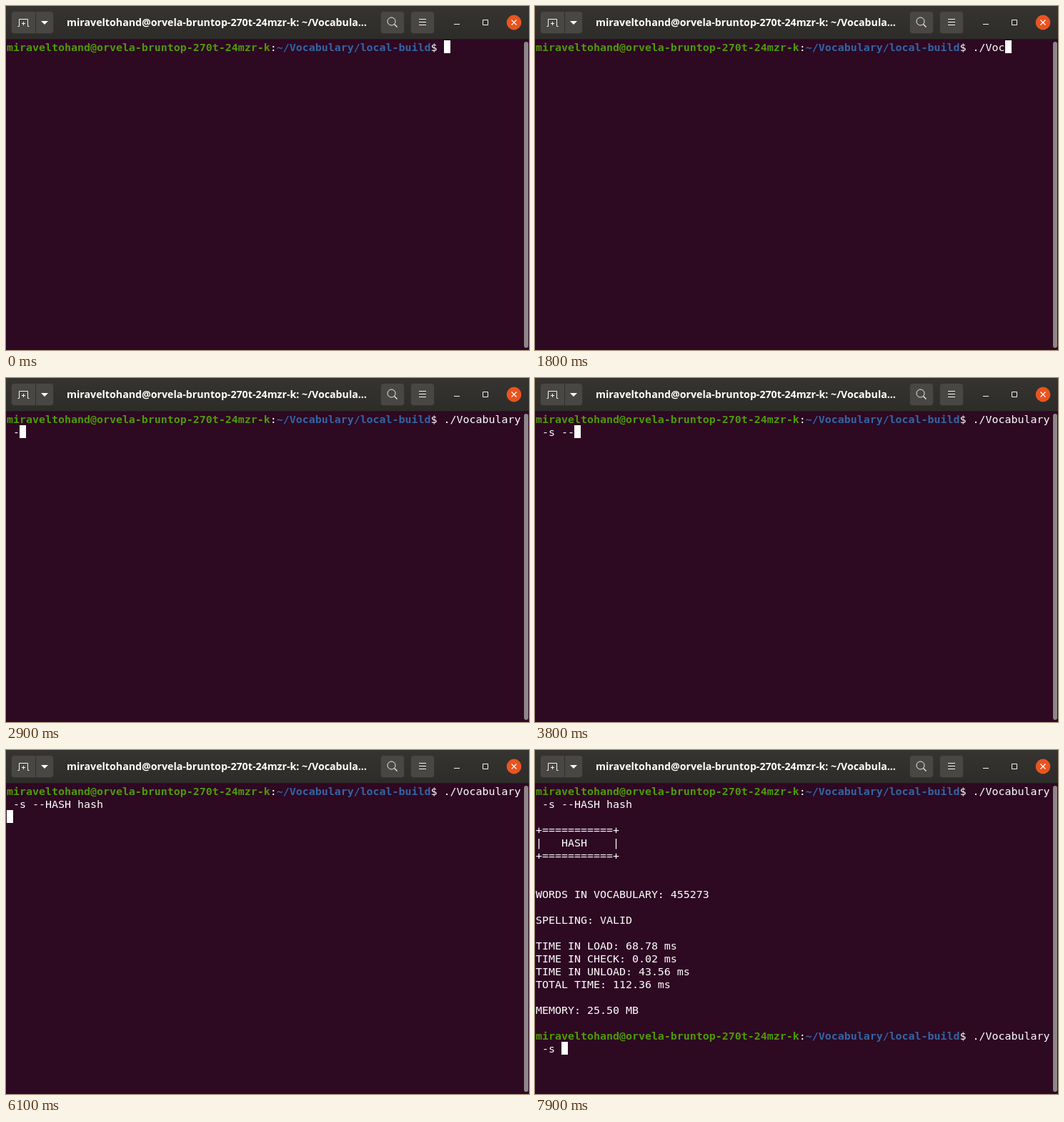
Write an HTML page that moves like this. It is 732x481 px and loops after 8000 ms.

```html
<!DOCTYPE html>
<html lang="en">
<head>
<meta charset="utf-8">
<title>Terminal</title>
<style>
  html, body { margin: 0; width: 100%; height: 100%; overflow: hidden; background: #2d0922; }
  svg { position: absolute; left: 0; top: 0; }
  pre {
    position: absolute; left: 1px; top: 49px; margin: 0; color: #fff;
    font: 14.95px/18px "DejaVu Sans Mono", monospace;
  }
  .host { color: #4e9a06; }
  .path { color: #3465a4; }
  #cursor { position: absolute; width: 9px; height: 18px; background: #fff; }
</style>
</head>
<body>
<svg width="732" height="481" viewBox="0 0 732 481">
  <defs>
    <linearGradient id="bar" x2="0" y2="1">
      <stop stop-color="#353431"/><stop offset="1" stop-color="#2d2c29"/>
    </linearGradient>
  </defs>
  <rect width="732" height="46" fill="url(#bar)"/>
  <rect y="46" width="732" height="1" fill="#1d1c1a"/>
  <g fill="#484744" stroke="#353431">
    <rect x="7.5" y="7.5" width="59" height="31" rx="4"/>
    <rect x="524.5" y="7.5" width="33" height="31" rx="4"/>
    <rect x="566.5" y="7.5" width="33" height="31" rx="4"/>
  </g>
  <path d="M41.5 8V38" stroke="#302f2c"/>
  <g fill="none" stroke="#f2f2f0">
    <path d="M16.5 28.5H18.5V18.5H30.5V28.5H32.5M22 24.5H27M24.5 22V27"/>
    <circle cx="539.5" cy="21.5" r="5.5"/>
    <path d="M543.5 25.5L547.5 29.5" stroke-width="1.2"/>
    <path d="M578 18.5H588M578 22.5H588M578 26.5H588"/>
    <path d="M627 25.5H635M667.5 19.5H674.5V26.5H667.5Z"/>
  </g>
  <path d="M49 21H59L54 26Z" fill="#fff"/>
  <circle cx="711" cy="23" r="10.4" fill="#e95420"/>
  <path d="M707.5 19.5L714.5 26.5M714.5 19.5L707.5 26.5" stroke="#fff" stroke-width="1.2"/>
  <text id="title" x="295" y="28" text-anchor="middle" fill="#fff"
        font-family="Open Sans, sans-serif" font-size="14.2" font-weight="700"></text>
  <rect x="725" y="50" width="6" height="428" rx="3" fill="#8f8789"/>
</svg>
<div id="cursor"></div>
<pre id="screen"></pre>
<script>
const LOOP = 8000, TICK = 100, KEY_GAP = 80;
const COLS = 80, CELL_W = 9, CELL_H = 18;
const ENTER = 6100, REPORT = 6300, BLINK_OFF = 6700, BLINK_ON = 7000;
const RECALL = 7500, ERASE_GAP = 200;

const host = "miraveltohand@orvela-bruntop-270t-24mzr-k";
const path = "~/Vocabulary/local-build";
const promptLength = host.length + path.length + 3;
const firstRow = COLS - promptLength;

// Bursts of typing by start time
const bursts = {
  400: "./", 800: "V", 1400: "o", 1800: "cabula", 2400: "ry", 2700: " ", 2900: "-s", 3200: " ",
  3600: "-", 3800: "-", 4300: "HA", 4600: "S", 4920: "H ", 5620: "ha", 5720: "sh"
};
const words = Object.values(bursts).join("").split(" ");

const rule = "+===========+";
const report = `
${rule}
|   HASH    |
${rule}


WORDS IN VOCABULARY: 455273

SPELLING: VALID

TIME IN LOAD: 68.78 ms
TIME IN CHECK: 0.02 ms
TIME IN UNLOAD: 43.56 ms
TOTAL TIME: 112.36 ms

MEMORY: 25.50 MB
`;

const screen = document.getElementById("screen");
const cursor = document.getElementById("cursor");
document.getElementById("title").textContent = host + ": " + path.slice(0, 10) + "…";

function typed(t) {
  return Object.entries(bursts).map(([start, keys]) =>
    keys.slice(0, Math.max(0, Math.floor((t - start) / KEY_GAP) + 1))).join("");
}

// The previous command comes back, then loses its last word at each step
function recalled(t) {
  if (t < RECALL) return "";
  const erased = Math.floor((t - RECALL) / ERASE_GAP);
  return words.slice(0, words.length - erased).join(" ") + (erased ? " " : "");
}

function promptLine(input) {
  return `<b class="host">${host}</b>:<b class="path">${path}</b>$ ` +
    input.slice(0, firstRow) + "\n" + input.slice(firstRow);
}

function placeCursor(row, column) {
  cursor.style.left = 1 + column % COLS * CELL_W + "px";
  cursor.style.top = 48 + (row + Math.floor(column / COLS)) * CELL_H + "px";
}

let shown = "";
function draw(t) {
  const input = typed(t);
  let html = promptLine(input);
  if (t < ENTER) placeCursor(0, promptLength + input.length);
  else if (t < REPORT) placeCursor(2, 0);
  else {
    const again = recalled(t);
    html += "\n" + report + "\n" + promptLine(again);
    placeCursor(19, promptLength + again.length);
  }
  cursor.hidden = t >= BLINK_OFF && t < BLINK_ON;
  if (html !== shown) screen.innerHTML = shown = html;
}

const start = performance.now();
function tick() {
  const t = (performance.now() - start) % LOOP;
  draw(Math.floor(t / TICK) * TICK);
  requestAnimationFrame(tick);
}
tick();
</script>
</body>
</html>
```
